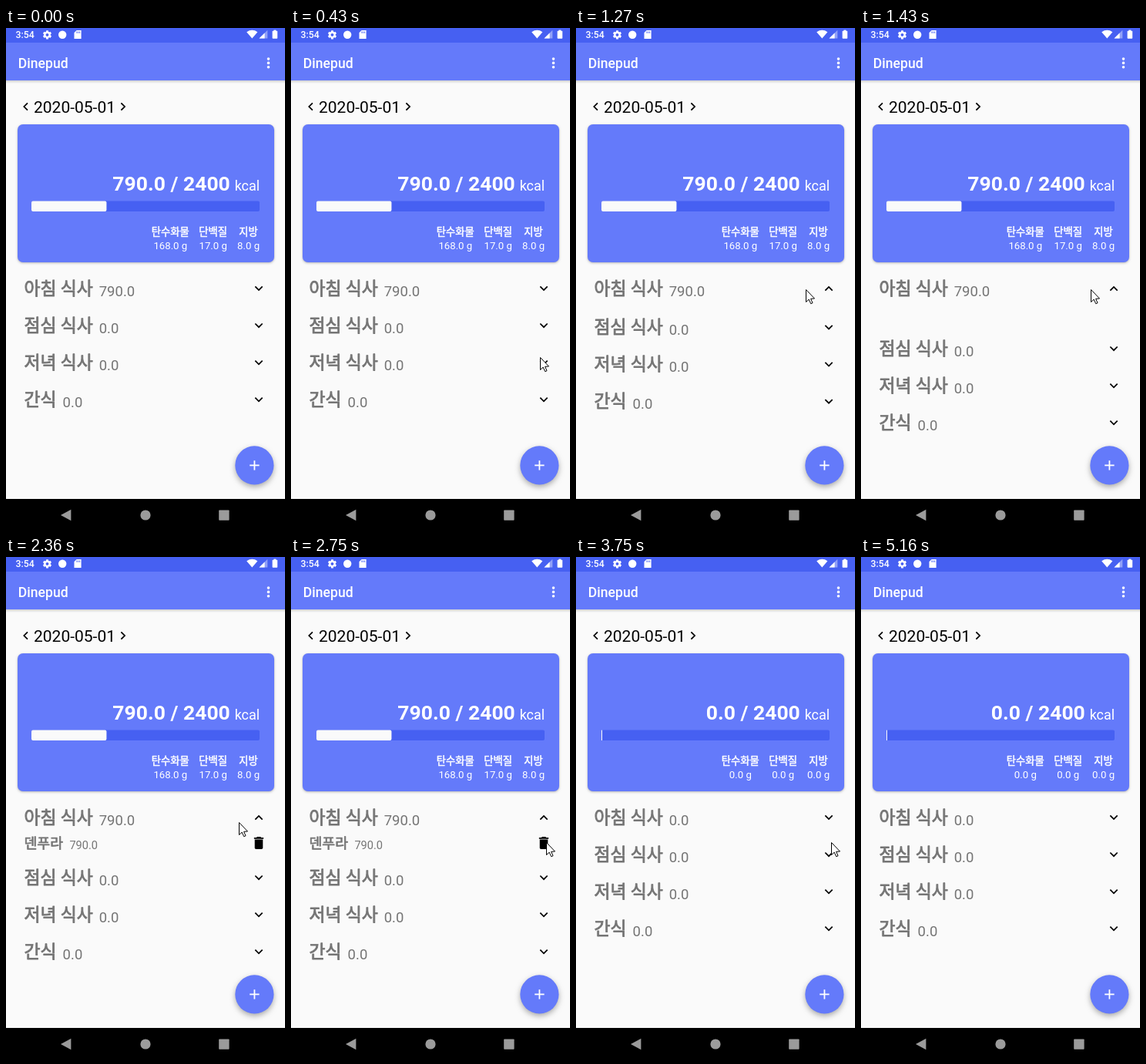
Recreate the animation shown at these times as an HTML page with a canvas. Size 362 by 650 pixels, loop 6470 ms.

```html
<!DOCTYPE html>
<html lang="ko">
<head>
<meta charset="utf-8">
<title>Dinepud</title>
<style>
html, body { margin: 0; width: 100%; height: 100%; overflow: hidden; background: #fafafa; }
canvas { display: block; width: 362px; height: 650px; }
</style>
</head>
<body>
<canvas id="stage"></canvas>
<script>
const W = 362, H = 650, LOOP = 6470;
const PRIMARY = '#647afa', DARK = '#4660f2', PAPER = '#fafafa', GRAY = '#757575';
const LATIN = 'Roboto, sans-serif';
const HANGUL = '"Noto Sans CJK KR", "Noto Sans CJK JP", "Noto Sans CJK", sans-serif';
const TRASH = new Path2D('M6 19c0 1.1.9 2 2 2h8c1.1 0 2-.9 2-2V7H6v12zM19 4h-3.5l-1-1h-5l-1 1H5v2h14V4z');

const canvas = document.getElementById('stage');
const ctx = canvas.getContext('2d');
const dpr = window.devicePixelRatio || 1;
canvas.width = W * dpr;
canvas.height = H * dpr;

const clamp = v => Math.max(0, Math.min(1, v));
const mix = (a, b, p) => a + (b - a) * p;
const smooth = p => p * p * (3 - 2 * p);
// progress from a to b, advancing in n equal jumps
const steps = (t, a, b, n) => Math.floor(clamp((t - a) / (b - a)) * n + 1e-6) / n;

function rect(x, y, w, h, color, r = 0) {
  ctx.fillStyle = color;
  ctx.beginPath();
  ctx.roundRect(x, y, w, h, r);
  ctx.fill();
}

function disc(x, y, r, color) {
  ctx.fillStyle = color;
  ctx.beginPath();
  ctx.arc(x, y, r, 0, Math.PI * 2);
  ctx.fill();
}

function trace(points, close) {
  ctx.beginPath();
  points.forEach(([x, y]) => ctx.lineTo(x, y));
  if (close) ctx.closePath();
}

function poly(points, color) {
  trace(points, true);
  ctx.fillStyle = color;
  ctx.fill();
}

function withShadow(blur, dy, alpha, draw) {
  ctx.save();
  ctx.shadowColor = `rgba(0,0,0,${alpha})`;
  ctx.shadowBlur = blur * dpr;
  ctx.shadowOffsetY = dy * dpr;
  draw();
  ctx.restore();
}

function text(str, x, y, size, color, align = 'left', weight = 400) {
  ctx.font = `${weight} ${size}px ${LATIN}`;
  ctx.textAlign = align;
  ctx.fillStyle = color;
  ctx.fillText(str, x, y);
}

// regular Hangul thickened by a thin outline
function hangul(str, x, y, size, color, align = 'left') {
  ctx.font = `400 ${size}px ${HANGUL}`;
  ctx.textAlign = align;
  ctx.fillStyle = ctx.strokeStyle = color;
  ctx.lineWidth = size / 26;
  ctx.lineJoin = 'round';
  ctx.fillText(str, x, y);
  ctx.strokeText(str, x, y);
}

function chevron(x, y, turn) {
  ctx.save();
  ctx.translate(x, y);
  ctx.rotate(turn * Math.PI / 2);
  trace([[-4.66, -2.6], [0, 2.06], [4.66, -2.6]]);
  ctx.lineJoin = 'miter';
  ctx.lineWidth = 1.76;
  ctx.strokeStyle = '#000';
  ctx.stroke();
  ctx.restore();
}

function gear(x, y) {
  ctx.save();
  ctx.translate(x, y);
  for (let i = 0; i < 6; i++) {
    rect(-1.5, -5.6, 3, 3, '#fff', 0.5);
    ctx.rotate(Math.PI / 3);
  }
  ctx.strokeStyle = '#fff';
  ctx.lineWidth = 2.4;
  ctx.beginPath();
  ctx.arc(0, 0, 3.1, 0, Math.PI * 2);
  ctx.stroke();
  ctx.restore();
}

function statusBar() {
  rect(0, 0, W, 19, DARK);
  text('3:54', 12.5, 13.4, 12.3, '#fff', 'left', 500);
  gear(53.5, 8.8);
  disc(73.2, 8.8, 5.2, '#fff');
  poly([[88.5, 6], [91.7, 3], [97.6, 3], [97.6, 14], [88.5, 14]], '#fff');
  for (let i = 0; i < 3; i++) rect(91.4 + i * 1.9, 4.4, 0.9, 2.4, DARK);

  ctx.fillStyle = '#fff';
  ctx.beginPath();
  ctx.moveTo(319.3, 13.6);
  ctx.lineTo(312.2, 5.2);
  ctx.quadraticCurveTo(319.3, 0.4, 326.4, 5.2);
  ctx.fill();

  poly([[328.5, 13.6], [339.3, 13.6], [339.3, 2.8]], 'rgba(255,255,255,.4)');
  poly([[328.5, 13.6], [335.6, 13.6], [335.6, 6.5]], '#fff');
  rect(347.4, 2.6, 3, 2, '#fff');
  rect(345.6, 3.8, 6.6, 10, '#fff', 0.8);
}

function appBar() {
  const g = ctx.createLinearGradient(0, 68, 0, 72);
  g.addColorStop(0, 'rgba(0,0,0,.16)');
  g.addColorStop(1, 'rgba(0,0,0,0)');
  rect(0, 68, W, 4, g);
  rect(0, 19, W, 49, PRIMARY);
  text('Dinepud', 15.8, 52, 17.6, '#fff', 'left', 500);
  for (let i = -1; i <= 1; i++) disc(340.5, 45.4 + i * 5.3, 1.8, '#fff');
}

function summary(kcal, grams) {
  chevron(25.4, 102, 1);
  text('2020-05-01', 36, 109.6, 21, '#000');
  chevron(152, 102, -1);

  withShadow(3, 1, 0.28, () => rect(15, 125, 333, 179, PRIMARY, 7));
  text(`${kcal.toFixed(1)} / 2400`, 290.8, 211, 26.5, '#fff', 'right', 700);
  text('kcal', 329.2, 211, 18, '#fff', 'right');

  rect(33, 224.5, 296, 13.5, DARK, 2);
  const fill = Math.max(1, 296 * kcal / 2400);
  rect(33, 224.5, fill, 13.5, PAPER, Math.min(2, fill / 2));

  [['탄수화물', 213.3], ['단백질', 268.7], ['지방', 314.6]].forEach(([label, x], i) => {
    hangul(label, x, 268.8, 13.3, '#fff', 'center');
    text(`${grams[i].toFixed(1)} g`, x, 287, 13.2, '#fff', 'center');
  });
}

function meals(first, open, shift, itemAlpha) {
  ['아침 식사', '점심 식사', '저녁 식사', '간식'].forEach((name, i) => {
    const y = i * 48.1 + (i ? shift : 0);
    hangul(name, 23.4, y + 345.8, 22.9, GRAY);
    text((i ? 0 : first).toFixed(1), i < 3 ? 120.7 : 73.6, y + 347.5, 18.5, GRAY);
    chevron(328, y + 338, open && !i ? 2 : 0);
  });
  if (!itemAlpha) return;
  ctx.save();
  ctx.globalAlpha = itemAlpha;
  hangul('덴푸라', 23.4, 377.8, 18.4, GRAY);
  text('790.0', 82.4, 378.8, 14.6, GRAY);
  ctx.translate(328 - 12 * 0.88, 371 - 12 * 0.88);
  ctx.scale(0.88, 0.88);
  ctx.fillStyle = '#000';
  ctx.fill(TRASH);
  ctx.restore();
}

function addButton() {
  withShadow(7, 3, 0.32, () => disc(322.4, 567.4, 25.1, PRIMARY));
  rect(316.2, 566.5, 12.4, 1.8, '#fff');
  rect(321.5, 561.2, 1.8, 12.4, '#fff');
}

function navBar() {
  const c = '#9b9b9b';
  rect(0, 611, W, 39, '#000');
  poly([[71, 632], [84.4, 624.7], [84.4, 639.3]], c);
  disc(181, 632, 6.6, c);
  rect(276.2, 625.4, 13.4, 13.4, c, 0.8);
}

function pointerAt(t) {
  if (t < 200 || t >= 5160) return null;
  if (t >= 5080) return [333, 399];
  if (t < 2360) {
    const p = smooth(steps(t, 200, 810, 8));
    return [mix(334, 298, p), mix(468, 339, p)];
  }
  const p = smooth(steps(t, 2360, 2750, 5));
  return [mix(302, 331, p), mix(344, 370, p)];
}

function pointer(t) {
  const at = pointerAt(t);
  if (!at) return;
  const [x, y] = at.map(Math.round);
  const pressed = (t >= 1040 && t < 1115) || (t >= 3380 && t < 3440);
  if (pressed) disc(x, y, 15, 'rgba(255,250,0,.5)');
  ctx.save();
  ctx.translate(x + 0.5, y + 0.5);
  trace([[0, 0], [0, 16], [3.7, 12.6], [6.2, 18.2], [8.5, 17.2], [6.1, 11.8], [11, 11.5]], true);
  ctx.fillStyle = '#fff';
  ctx.fill();
  ctx.strokeStyle = '#000';
  ctx.lineWidth = 1;
  ctx.lineJoin = 'miter';
  ctx.stroke();
  ctx.restore();
}

function render(t) {
  ctx.setTransform(dpr, 0, 0, dpr, 0, 0);
  rect(0, 0, W, H, PAPER);

  const deleted = t >= 3520, cleared = t >= 3750;
  const q = 1040 + 540 * steps(t, 1040, 1580, 7);
  const open = q > 1190 && !deleted;
  const shift = open ? 30 * smooth(clamp((q - 1150) / 260)) : 0;
  const alpha = open ? clamp((q - 1430) / 150) : 0;

  appBar();
  statusBar();
  summary(cleared ? 0 : 790, cleared ? [0, 0, 0] : [168, 17, 8]);
  meals(deleted ? 0 : 790, open, shift, alpha);
  addButton();
  navBar();
  pointer(t);
}

const start = performance.now();
function tick(now) {
  render(Math.max(0, now - start) % LOOP);
  requestAnimationFrame(tick);
}
tick(start);
</script>
</body>
</html>
```
